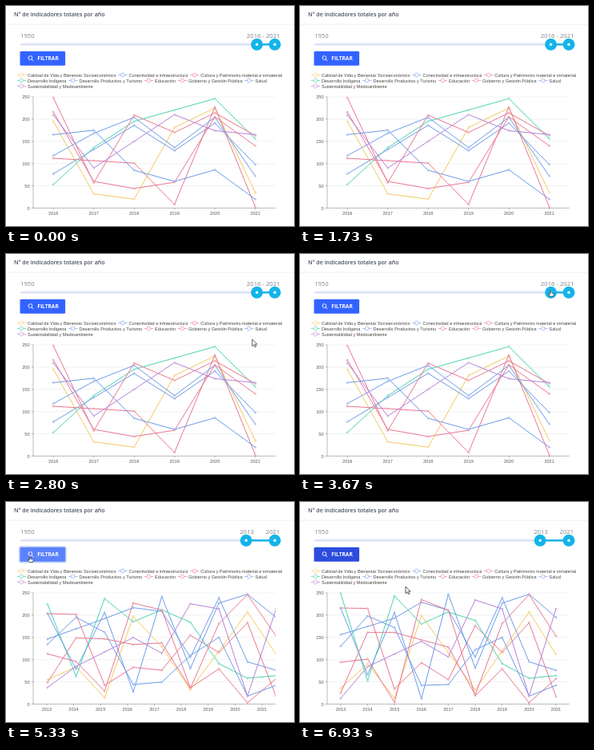
These frames come from a looping animation (360x276 px, 6990 ms). An HTML page with a canvas:

```html
<!DOCTYPE html>
<html lang="es">
<head>
<meta charset="utf-8">
<title>Indicadores por año</title>
<style>
html, body { margin: 0; width: 100%; height: 100%; overflow: hidden; background: #fff; }
canvas { display: block; width: 360px; height: 276px; }
</style>
</head>
<body>
<canvas id="stage"></canvas>
<script>
const LOOP = 6990, W = 360, H = 276;
const GRAB = 3780, RELEASE = 4230, CLICK = 5130, UPDATE_MS = 400;
const SMALL = '5.56px "Liberation Sans", Arial, sans-serif';
const OPEN = '"Open Sans", sans-serif';
const YELLOW = '#f5c761', BLUE = '#6d9be8', PINK = '#e9768f', GREEN = '#4bd3ab', PURPLE = '#b481d6';
const grid = { left: 34, right: 336.8, top: 114, bottom: 253.5 };

const canvas = document.getElementById('stage');
const dpr = window.devicePixelRatio || 1;
canvas.width = W * dpr;
canvas.height = H * dpr;
const ctx = canvas.getContext('2d');

const clamp = v => Math.max(0, Math.min(1, v));
const mix = (a, b, k) => a + (b - a) * k;
const smooth = k => k * k * (3 - 2 * k);
const ramp = (t, start, length) => smooth(clamp((t - start) / length));
const yOf = v => mix(grid.bottom, grid.top, v / 250);
const xOf = (i, n) => mix(grid.left, grid.right, (i + 0.5) / n);
const yearX = year => mix(18, 336, (year - 1950) / 71);

// Years left empty lie on the straight line between their neighbours.
function fillGaps(keys) {
  const out = Array.from(keys);
  for (let i = 0; i < out.length; i++) {
    if (out[i] !== undefined) continue;
    let next = i + 1;
    while (out[next] === undefined) next++;
    out[i] = mix(out[i - 1], out[next], 1 / (next - i + 1));
  }
  return out;
}

const makeSeries = (name, color, before, after) =>
  ({ name, color, before: fillGaps(before), after: fillGaps(after) });

const series = [
  makeSeries('Calidad de Vida y Bienestar Socioeconómico', YELLOW,
    [195, 32, 20, 181, 225, 35], [35, 91, 13, 199, , 32, , 207, 112]),
  makeSeries('Conectividad e infraestructura', BLUE,
    [77, , 186, 129, 191, 98], [156, , 193, 229, 211, 106, 239, 95, 76]),
  makeSeries('Cultura y Patrimonio material e inmaterial', PINK,
    [112, , 101, 8, 227, 3], [216, 215, 34, 93, 55, 176, 116, 183, 17]),
  makeSeries('Desarrollo Indígena', GREEN,
    [53, 136, 195, , 246, 156], [249, 52, 243, 180, 207, 188, 91, 58, 64]),
  makeSeries('Desarrollo Productivo y Turismo', BLUE,
    [118, 168, 204, 136, 204, 72], [216, 66, 206, 12, 247, 81, 227, 247, 195]),
  makeSeries('Educación', PINK,
    [248, 57, 209, 170, 214, 163], [94, 101, 4, 235, 211, 19, 79, 3, 57]),
  makeSeries('Gobierno y Gestión Pública', PINK,
    [216, 60, 44, 58, 205, 140], [25, 161, 161, , 128, 21, 181, 246, 153]),
  makeSeries('Salud', BLUE,
    [165, 175, 85, 60, 86, 20], [130, 198, 172, 42, 44, 122, 150, 18, 42]),
  makeSeries('Sustentabilidad y Medioambiente', PURPLE,
    [209, 90, , 210, 174, 165], [13, 84, , 141, 106, 234, 214, 18, 214])
];

// Legend entries flow from left to right and wrap at the edge.
function layoutLegend() {
  ctx.font = SMALL;
  let x = 27, y = 86.5;
  for (const s of series) {
    const width = ctx.measureText(s.name).width;
    if (x + width > 350) {
      x = 27;
      y += 7;
    }
    s.x = x;
    s.y = y;
    x += width + 16;
  }
}

// time, x, y of the pointer tip
const path = [
  [1000, 363, 222], [1270, 309, 247], [1650, 363, 229], [2300, 311, 234],
  [3000, 307, 76], [3670, 312, 46], [RELEASE, 299, 47], [4600, 23, 65],
  [5250, 24, 66], [5730, 87, 98], [6400, 132, 106]
];

function pointerAt(t) {
  const i = path.findIndex(p => p[0] > t);
  if (i === 0) return null;
  if (i < 0) return path[path.length - 1].slice(1);
  const a = path[i - 1], b = path[i];
  const k = ramp(t, a[0], b[0] - a[0]);
  return [mix(a[1], b[1], k), mix(a[2], b[2], k)];
}

function text(str, x, y, font, color, align = 'left') {
  ctx.font = font;
  ctx.fillStyle = color;
  ctx.textAlign = align;
  ctx.fillText(str, x, y);
}

function line(x1, y1, x2, y2, color, width = 0.5) {
  ctx.strokeStyle = color;
  ctx.lineWidth = width;
  ctx.beginPath();
  ctx.moveTo(x1, y1);
  ctx.lineTo(x2, y2);
  ctx.stroke();
}

function dot(x, y, r, fill, stroke, width = 0.7) {
  ctx.beginPath();
  ctx.arc(x, y, r, 0, 7);
  ctx.fillStyle = fill;
  ctx.fill();
  if (!stroke) return;
  ctx.strokeStyle = stroke;
  ctx.lineWidth = width;
  ctx.stroke();
}

function box(x, y, w, h, r, color) {
  ctx.beginPath();
  ctx.roundRect(x, y, w, h, r);
  ctx.fillStyle = color;
  ctx.fill();
}

function drawSlider(t) {
  const start = 2016 - Math.round(3 * ramp(t, GRAB, RELEASE - GRAB));
  const x = yearX(start), end = yearX(2021), y = 48.2;
  const font = '7.7px ' + OPEN, grey = '#7b838c', cyan = '#12b4ea';
  const held = t > GRAB && t < CLICK;
  text('1950', 18, 39.7, font, grey);
  if (start > 2013) {
    text(start + ' - 2021', 342.5, 39.7, font, grey, 'right');
  } else {
    text('2013', 301, 39.7, font, grey, 'center');
    text('2021', 333.3, 39.7, font, grey, 'center');
  }
  box(18, y - 1.2, 318, 2.4, 1.2, '#dce2f7');
  box(x, y - 1.2, end - x, 2.4, 0, cyan);
  for (const cx of [x, end]) {
    dot(cx, y, 7.5, cyan);
    dot(cx, y, 1.7, held && cx === x ? '#17445a' : '#fff');
  }
  if (held) {
    ctx.strokeStyle = '#34505e';
    ctx.lineWidth = 0.8;
    ctx.strokeRect(x - 7.5, y - 7.5, 15, 15);
  }
}

function drawButton(t) {
  const leave = ramp(t, 5780, 400);
  const hover = ramp(t, 4550, 150) * (1 - leave);
  const base = t > CLICK ? [44, 76, 222] : [51, 99, 255];
  const lit = [91, 130, 250];
  const rgb = base.map((c, i) => Math.round(mix(c, lit[i], hover)));
  const glow = 0.35 * ramp(t, CLICK, 150) * (1 - leave);
  box(15.8, 55.2, 60, 21.2, 3, `rgba(91,130,250,${glow})`);
  box(17.5, 56.8, 56.6, 18, 1.5, `rgb(${rgb})`);
  dot(30.4, 65, 2.4, 'transparent', '#fff', 0.9);
  line(32.1, 66.8, 34.2, 69, '#fff', 1);
  text('FILTRAR', 39.3, 68.2, '700 6.6px ' + OPEN, '#fff');
}

function drawLegend() {
  for (const { name, color, x, y } of series) {
    ctx.globalAlpha = 0.8;
    line(x - 13.3, y, x - 2, y, color, 0.8);
    dot(x - 7.7, y, 2.4, '#fff', color);
    ctx.globalAlpha = 1;
    text(name, x, y + 2, SMALL, '#444');
  }
}

function drawAxes(first, count) {
  const { left, right, top, bottom } = grid, ink = '#777';
  for (let v = 0; v <= 250; v += 50) {
    const y = yOf(v);
    if (v) line(left, y, right, y, '#e2e4e8');
    line(left - 2.3, y, left, y, ink);
    text(v, 29.5, y + 2, SMALL, '#555', 'right');
  }
  line(left, top, left, bottom, ink);
  line(left, bottom, right, bottom, ink);
  for (let i = 0; i < count; i++) {
    const x = xOf(i, count);
    line(x, bottom, x, bottom + 2.3, ink);
    text(first + i, x, 262, SMALL, '#555', 'center');
  }
}

function drawLines(t, filtered, marked) {
  const k = 1 - Math.pow(1 - clamp((t - CLICK) / UPDATE_MS), 3);
  ctx.save();
  ctx.beginPath();
  ctx.rect(grid.left, grid.top - 4, grid.right - grid.left, grid.bottom - grid.top + 8);
  ctx.clip();
  ctx.lineJoin = 'round';
  for (const s of series) {
    const points = (filtered ? s.after : s.before).map((v, i) => filtered
      ? [mix(xOf(i, 6), xOf(i, 9), k), yOf(mix(s.before[i] ?? v, v, k))]
      : [xOf(i, 6), yOf(v)]);
    ctx.beginPath();
    points.forEach(p => ctx.lineTo(...p));
    ctx.strokeStyle = s.color;
    ctx.lineWidth = 1;
    ctx.stroke();
    for (const [x, y] of points) dot(x, y, s.name === marked ? 2.6 : 0.95, '#fff', s.color);
  }
  ctx.restore();
}

const arrow = new Path2D('M0 0V8.6L2 6.8L3.4 9.8L4.9 9.1L3.5 6.2H6.1Z');
const hand = new Path2D('M.4 .4Q1.1-.4 1.8 .4V2.8L4.7 3.4Q5.5 3.8 5.3 4.8L4.6 7.2H.6L-1.5 4.7Q-1.5 3.6-.4 4L.4 4.7Z');

function drawPointer(t) {
  const tip = pointerAt(t);
  if (!tip) return;
  const overHandle = t > 3250 && t < RELEASE + 80;
  const overButton = t > 4520 && t < 5400;
  const shape = overHandle || overButton ? hand : arrow;
  ctx.save();
  ctx.translate(...tip);
  ctx.fillStyle = '#fff';
  ctx.strokeStyle = '#30343a';
  ctx.lineWidth = 0.8;
  ctx.lineJoin = 'round';
  ctx.fill(shape);
  ctx.stroke(shape);
  ctx.restore();
}

function draw(t) {
  const filtered = t >= CLICK;
  const marked = t > 5600 && t < 5850 ? 'Desarrollo Productivo y Turismo' : '';
  ctx.setTransform(dpr, 0, 0, dpr, 0, 0);
  ctx.fillStyle = '#fff';
  ctx.fillRect(0, 0, W, H);
  text('N° de indicadores totales por año', 10, 13, '600 7.05px ' + OPEN, '#454e5e');
  line(0, 23, W, 23, '#eceff3', 0.9);
  drawSlider(t);
  drawButton(t);
  drawLegend();
  drawAxes(filtered ? 2013 : 2016, filtered ? 9 : 6);
  drawLines(t, filtered, marked);
  drawPointer(t);
}

layoutLegend();
const began = performance.now();
function tick() {
  draw((performance.now() - began) % LOOP);
  requestAnimationFrame(tick);
}
tick();
</script>
</body>
</html>
```
